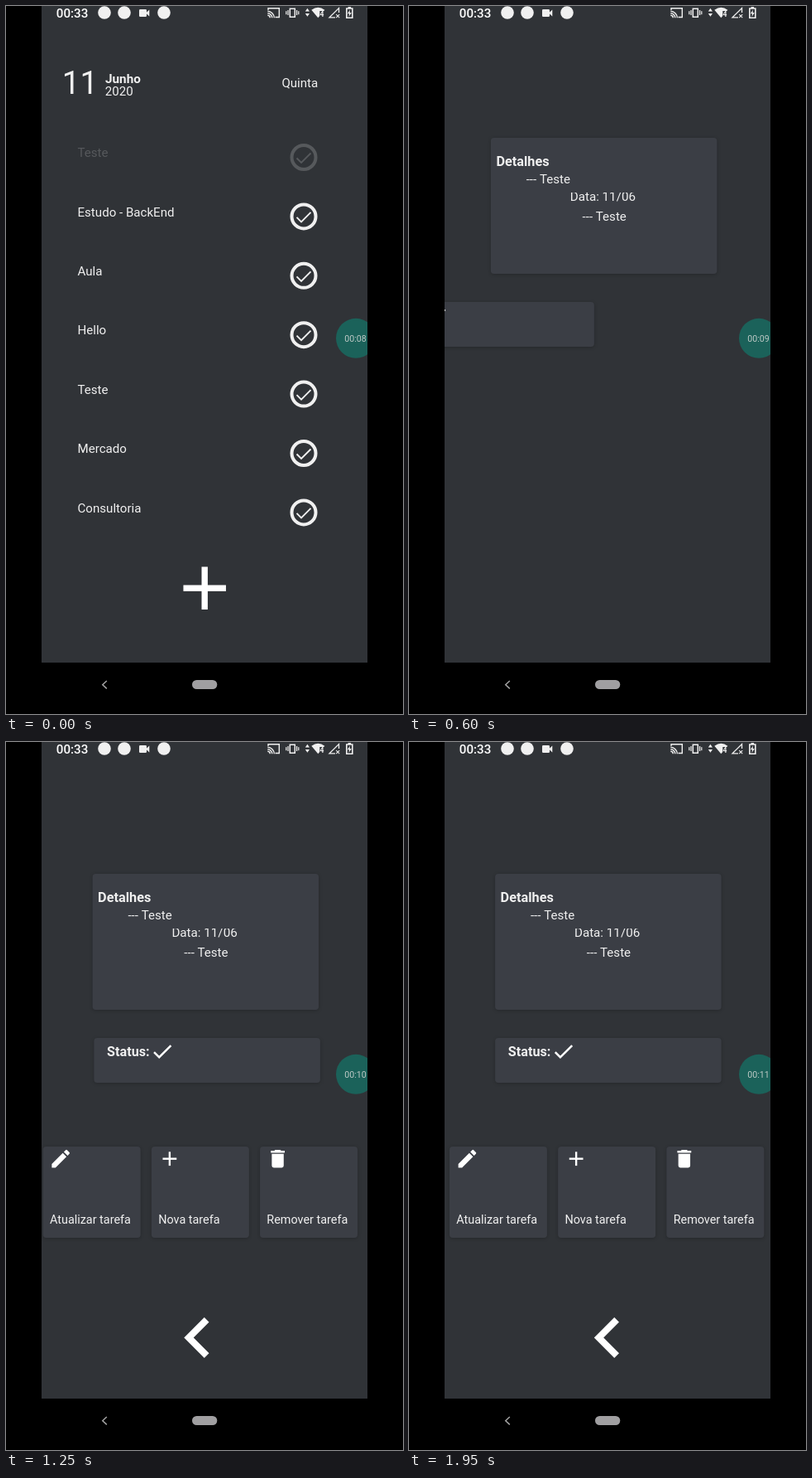
An HTML page with a canvas for the animation above (2000 ms loop, 480 px wide and 854 px high).

```html
<!DOCTYPE html>
<html lang="pt">
<head>
<meta charset="utf-8">
<title>Tarefas</title>
<style>
html, body { margin: 0; width: 100%; height: 100%; overflow: hidden; background: #000; }
canvas { display: block; width: 480px; height: 854px; }
</style>
</head>
<body>
<canvas id="stage" width="480" height="854"></canvas>
<script>
const ctx = document.getElementById('stage').getContext('2d');
const LOOP = 2000, STEP = 50;
const LEFT = 43, WIDTH = 394, BOTTOM = 792;
const BG = '#303337', CARD = '#3b3e45', INK = '#f0f0f0';

// Every part enters from the left, then swings around its rest position once it lands
const details = { start: 0.33, rate: 16, land: 0.646, swing: -10 };
const status = { start: 0.513, rate: 11, land: 1.05, swing: 5 };
const actions = { start: 0.6, rate: 20, land: 0.807, swing: 19 };
const back = { start: 0.685, rate: 6.6, land: 1.5, swing: 4 };

function slide({ start, rate, land, swing }, t) {
  const s = Math.max(0, t / 1000 - start), w = Math.max(0, t / 1000 - land);
  return -400 * Math.exp(-rate * s) + swing * Math.exp(-3 * w) * Math.sin(10 * w);
}

function text(str, x, y, size = 15.1, weight = 400, color = INK) {
  ctx.font = `${weight} ${size}px Roboto, sans-serif`;
  ctx.fillStyle = color;
  ctx.fillText(str, x, y);
}

function rect(x, y, w, h, color = INK) {
  ctx.fillStyle = color;
  ctx.fillRect(x, y, w, h);
}

function pill(x, y, w, h, r, color = INK) {
  ctx.fillStyle = color;
  ctx.beginPath();
  ctx.roundRect(x, y, w, h, r);
  ctx.fill();
}

function disc(x, y, r, color = INK) {
  ctx.fillStyle = color;
  ctx.beginPath();
  ctx.arc(x, y, r, 0, Math.PI * 2);
  ctx.fill();
}

function arc(x, y, r, width, from = 0, to = Math.PI * 2) {
  ctx.strokeStyle = INK;
  ctx.lineWidth = width;
  ctx.beginPath();
  ctx.arc(x, y, r, from, to);
  ctx.stroke();
}

function line(path, x, y, width, color = INK) {
  ctx.save();
  ctx.translate(x, y);
  ctx.strokeStyle = color;
  ctx.lineWidth = width;
  ctx.stroke(new Path2D(path));
  ctx.restore();
}

function shape(path, x, y, scale = 1, color = INK) {
  ctx.save();
  ctx.translate(x, y);
  ctx.scale(scale, scale);
  ctx.fillStyle = color;
  ctx.fill(new Path2D(path));
  ctx.restore();
}

function plus(x, y, size, width) {
  rect(x - size / 2, y - width / 2, size, width, '#fff');
  rect(x - width / 2, y - size / 2, width, size, '#fff');
}

function pencil(x, y) {
  shape('M-9 5.25V9h3.75L5.8-2.06 2.06-5.8zM8.7-5a1 1 0 0 0 0-1.4L6.4-8.7a1 1 0 0 0-1.4 0L3.1-6.9 6.9-3.1z', x, y, 1.2, '#fff');
}

function trash(x, y) {
  shape('M-6 7a2 2 0 0 0 2 2h8a2 2 0 0 0 2-2V-5H-6zM7-8H3.5l-1-1h-5l-1 1H-7v2H7z', x, y, 1.2, '#fff');
}

function card(x, y, w, h) {
  ctx.save();
  ctx.shadowColor = 'rgba(0,0,0,.22)';
  ctx.shadowBlur = 4;
  ctx.shadowOffsetY = 1;
  pill(x, y, w, h, 4, CARD);
  ctx.restore();
}

function listPage() {
  text('11', 67.8, 106, 38.5);
  text('Junho', 120, 93, 15.3, 700);
  text('2020', 119.7, 108);
  text('Quinta', 333.4, 97.5);
  ['Teste', 'Estudo - BackEnd', 'Aula', 'Hello', 'Teste', 'Mercado', 'Consultoria'].forEach((name, i) => {
    const y = 182.5 + i * 71.4;
    ctx.globalAlpha = i ? 1 : 0.2; // the first row is pressed
    text(name, 86.5, y - 0.3);
    arc(360, y, 14.5, 4);
    line('M-8.5 1L-3 6.5L8.5-5', 360, y, 1.9);
  });
  ctx.globalAlpha = 1;
  plus(240.2, 702.2, 51.5, 7.4);
}

function detailPage(t) {
  let x = 104.2 + slide(details, t);
  card(x, 159, 273.5, 164);
  text('Detalhes', x + 6.5, 193, 16.3, 700);
  text('--- Teste', x + 42.8, 214);
  ctx.save();
  ctx.beginPath();
  ctx.rect(x, 225, 273, 20);
  ctx.clip();
  text('Data: 11/06', x + 95.8, 235.2, 15.2);
  ctx.restore();
  text('--- Teste', x + 110.7, 259);

  x = 104 + slide(status, t);
  card(x, 357, 273.5, 54);
  text('Status:', x + 15.7, 379, 16.2, 700);
  shape('M-3 4.2L-7.2 0-8.6 1.4-3 7 9-5 7.6-6.4z', x + 82.6, 373.3, 1.26, '#fff');

  x = 49.5 + slide(actions, t);
  ['Atualizar tarefa', 'Nova tarefa', 'Remover tarefa'].forEach((label, i) => {
    const left = x + i * 131.2;
    card(left, 488, 118, 110);
    text(label, left + 8.3, 580.5, 14.4);
  });
  pencil(x + 21.5, 502.7);
  plus(x + 153.2, 502.7, 16.8, 2.4);
  trash(x + 283.9, 502.7);

  shape('M3.7-4.6L2.3-6-3.7 0 2.3 6 3.7 4.6-.9 0z', 240 + slide(back, t), 718.5, 4.08, '#fff');
}

function statusBar() {
  text('00:33', 60.8, 14, 15.2, 500, '#fff');
  for (const x of [119, 143, 191]) disc(x, 8, 7.8);

  // camera
  pill(161, 4, 9, 9, 1.2);
  shape('M0 0L4.3-4V4z', 169, 8.5);

  // cast
  line('M0 2.2V0H13.3V10.7H8.5', 317, 2.8, 1.4);
  for (let r = 3; r < 9; r += 2.5) arc(316.3, 14.3, r, 1.4, -Math.PI / 2, 0);

  // vibrate
  line('M-3-5H3V5H-3z', 346.3, 8.2, 1.5);
  for (const side of [-1, 1]) {
    rect(345.7 + side * 5.3, 5, 1.2, 6);
    rect(345.7 + side * 7.5, 6.2, 1.2, 4);
  }

  // data arrows and wifi
  shape('M-2.6-1.2L0-5 2.6-1.2zM-2.6 1.2L0 5 2.6 1.2z', 364.4, 7.8);
  shape('M0 0L-8-9.6Q0-15.3 8-9.6z', 377.3, 14.3);
  rect(379.3, 6, 6, 8.5, BG);
  text('4', 379.6, 13, 8.5, 700);

  // signal
  line('M11.5-5.8V-11.3L0 0H7', 391, 13.8, 1.3);
  line('M-2-2L2 2M2-2L-2 2', 401.2, 12.2, 1.1);

  // battery
  rect(413.5, 1, 3.6, 2);
  line('M-3.5-5.6H3.5V5.6H-3.5z', 415.3, 8.6, 1.6);
  shape('M.7-4L-2.5.8H-.3L-.8 4.5 2.5-.6H.3z', 415.3, 8.5);
}

function timer(t) {
  const sec = 8 + Math.floor((t + 120) / 620);
  disc(423, 400.8, 24, '#1b625a');
  text('00:' + String(sec).padStart(2, '0'), 409.3, 405, 10.6, 400, '#bdc9c6');
}

function draw(t) {
  rect(0, 0, 480, 854, '#000');
  ctx.save();
  ctx.beginPath();
  ctx.rect(LEFT, 0, WIDTH, BOTTOM);
  ctx.clip();
  rect(LEFT, 0, WIDTH, BOTTOM, BG);

  // the new page slides up over the list
  const u = Math.min(1, Math.max(0, (t - 126) / 260));
  const edge = BOTTOM * (1 - u) ** 4;
  if (u < 1) listPage();
  if (u > 0) {
    rect(LEFT, 24, WIDTH, BOTTOM, `rgba(0,0,0,${0.1 * u})`);
    rect(LEFT, edge, WIDTH, BOTTOM, BG);
    if (u < 1) rect(LEFT, edge, WIDTH, 1, '#484b4e');
    detailPage(t);
  }
  statusBar();
  timer(t);
  ctx.restore();

  line('M2.5-4.7L-2.5 0L2.5 4.7', 119.3, 818.7, 1.5, '#a2a2a2');
  pill(225, 813, 30.3, 11, 5.5, '#a09fa1');
}

const begin = performance.now();
function tick() {
  const t = (performance.now() - begin) % LOOP;
  draw(t - t % STEP);
  requestAnimationFrame(tick);
}
tick();
</script>
</body>
</html>
```
